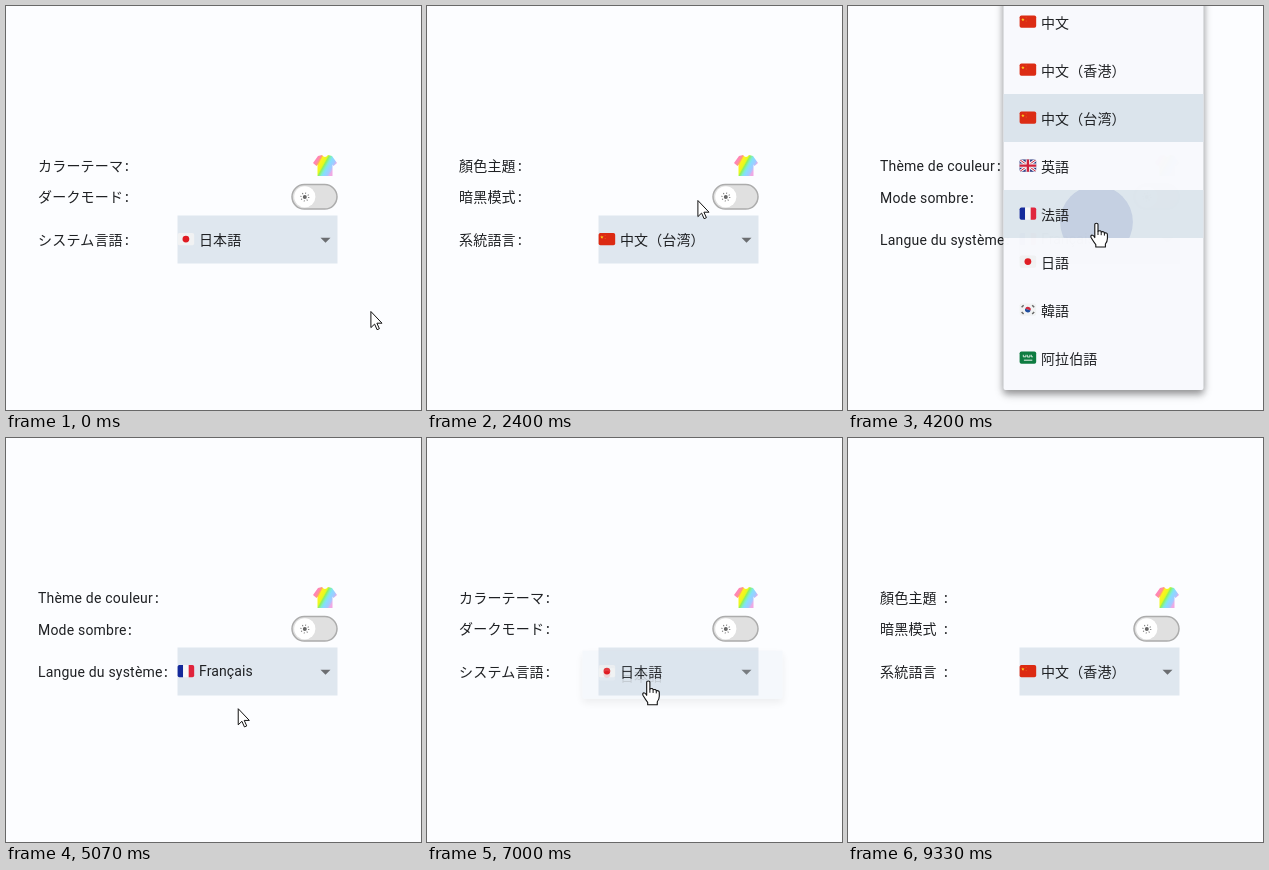
These frames come from a looping animation (415 px wide and 404 px high, 9.74 s). An HTML page:

```html
<!DOCTYPE html>
<html lang="ja">
<head>
<meta charset="utf-8">
<title>Language settings</title>
<style>
  html, body { margin: 0; width: 100%; height: 100%; overflow: hidden; background: #fcfdff; }
  svg { display: block; }
  text { font: 14px Roboto, "Noto Sans CJK JP", "Noto Sans CJK", sans-serif; fill: #1f2124; letter-spacing: .1px; }
  .label text { letter-spacing: .2px; }
  .label .colon { font-weight: 500; }
  .zh text { font-family: Roboto, "Noto Sans CJK TC", "Noto Sans CJK JP", "Noto Sans CJK", sans-serif; }
  #sheet { fill: #f8f9fd; filter: drop-shadow(0 4px 3px rgba(0,0,0,.25)) drop-shadow(0 3px 5px rgba(0,0,0,.25)); }
</style>
</head>
<body>
<svg id="stage" width="415" height="404" viewBox="0 0 415 404">
  <defs>
    <linearGradient id="rainbow" gradientUnits="userSpaceOnUse" x1="309" y1="153" x2="329" y2="164">
      <stop offset=".12" stop-color="#ff86b4"/><stop offset=".2" stop-color="#ffa070"/>
      <stop offset=".26" stop-color="#fff21e"/><stop offset=".42" stop-color="#e4fa1e"/>
      <stop offset=".48" stop-color="#8ef060"/><stop offset=".58" stop-color="#7fecd0"/>
      <stop offset=".66" stop-color="#86dcff"/><stop offset=".82" stop-color="#a4c8ff"/>
      <stop offset=".92" stop-color="#f0a8e4"/>
    </linearGradient>
    <clipPath id="flagClip"><rect x="-8.3" y="-6.2" width="16.6" height="12.4" rx="1.8"/></clipPath>
    <clipPath id="rowClip"><rect id="rowBox" x="155.5" width="200" height="48"/></clipPath>
  </defs>

  <path fill="url(#rainbow)" d="M312 150 L316 149 Q319 153 322 149 L326 150 L331 157 L327.5 160 L326.5 158.5 V170 H311.5 V158.5 L310.5 160 L307 157Z"/>

  <rect x="286" y="178.6" width="45" height="24.4" rx="12.2" fill="#e0e0e0" stroke="#acacac" stroke-width="1.5"/>
  <circle cx="298.8" cy="190.8" r="10.6" fill="#fff"/>
  <g stroke="#777" fill="#666">
    <circle cx="298.8" cy="191" r="2" stroke="none"/>
    <circle cx="298.8" cy="191" r="3.9" fill="none" stroke-width="1.3" stroke-dasharray=".9 2.16"/>
  </g>

  <rect x="171.5" y="209.5" width="160" height="48" fill="#dfe7ef"/>
  <path d="M314.5 231.7 H324.5 L319.5 236.7Z" fill="#6c6e71"/>
  <g id="labels"></g>

  <g id="menu">
    <rect id="sheet" x="155.5" width="200" rx="2"/>
    <g id="rows"></g>
  </g>

  <g id="arrow">
    <path d="M.9 .5 V16.6 L4.6 13.1 L7.1 18.7 L9.4 17.7 L6.9 12.2 H12Z" fill="#fff" stroke="#111"/>
  </g>
  <g id="hand">
    <g transform="translate(-.6 -.4)">
      <path d="M-1.6 15 V2 Q-1.6 .6 0 .6 Q1.6 .6 1.6 2 V8.6 Q4.4 7.4 4.8 9.4 Q7.4 8.4 8 10.4 Q11 9.8 11 12.2 V16 Q11 19 9 21.4 V24.4 H-.6 V22 Q-2.6 19.6 -5.2 15.2 Q-6.2 13 -4.4 12.4 Q-3 12.4 -1.6 15Z"
        fill="#fff" stroke="#111" stroke-width="1.1" stroke-linejoin="round"/>
      <path d="M1.6 8.6 V12.4 M4.8 9.4 V12.6 M8 10.4 V13" stroke="#111" fill="none"/>
    </g>
  </g>
</svg>

<script>
const LOOP = 9740, FPS = 15, ROW = 48, LEFT = 155.5, WIDTH = 200;
const $ = id => document.getElementById(id);

const zhNames = ['中文', '中文（香港）', '中文（台湾）', '英語', '法語', '日語', '韓語', '阿拉伯語'];
const zhLabels = ['顏色主題', '暗黑模式', '系統語言'];
const langs = {
  ja: { labels: ['カラーテーマ', 'ダークモード', 'システム言語'], colons: [121, 121, 121], sel: 5, top: -35.3,
        names: ['中国語', '中国語（香港）', '中国語(台湾)', '英語', 'フランス語', '日本語', '韓国語', 'アラビア語'] },
  tw: { labels: zhLabels, colons: [93, 93, 93], sel: 2, top: -16, names: zhNames, zh: true },
  fr: { labels: ['Thème de couleur', 'Mode sombre', 'Langue du système'], colons: [151, 124, 160], sel: 4, top: -16, latin: true,
        names: ['Chinois', 'Chinese (Hong Kong)', 'Chinois (Taïwan)', 'Anglais', 'Français', 'Japonais', 'Coréen', 'Arabe'] },
  hk: { labels: zhLabels, colons: [98, 98, 98], sel: 1, top: -16, names: zhNames, zh: true }
};

// Each visit to the menu: opened, item pressed, item released
const visits = [
  { from: 'ja', to: 'tw', open: 630, press: 2060, up: 2199, item: 2 },
  { from: 'tw', to: 'fr', open: 2960, press: 4060, up: 4199, item: 4 },
  { from: 'fr', to: 'ja', open: 5333, press: 6460, up: 6630, item: 5 },
  { from: 'ja', to: 'hk', open: 6990, press: 8660, up: 8799, item: 1 }
];

// Pointer tip: time, x, y
const path = [
  [0, 364, 305], [70, 364, 305], [600, 304, 239], [1130, 304, 239], [1530, 290, 138],
  [1870, 290, 138], [1930, 280, 108], [2230, 280, 108], [2400, 270, 194], [2650, 272, 225],
  [2930, 255, 215], [3440, 255, 215], [3670, 250, 78], [3930, 249, 217], [4480, 249, 217],
  [4900, 238, 290], [5300, 222, 242.5], [6140, 222, 242.5], [6200, 221.5, 242], [7250, 222, 243],
  [7533, 240, 12], [7670, 192, 1], [7950, 192, 1], [8130, 256, 27], [8420, 256, 27],
  [8530, 177, 38], [8850, 177, 38], [9320, 215, 424], [LOOP, 215, 424]
];

const clamp = v => Math.max(0, Math.min(1, v));
const mix = (a, b, p) => a + (b - a) * p;
const rect = (x, y, w, h, fill) => `<rect x="${x}" y="${y}" width="${w}" height="${h}" fill="${fill}"/>`;
const line = (d, color, w) => `<path d="${d}" stroke="${color}" stroke-width="${w}" fill="none"/>`;
const text = (x, y, s, extra = '') => `<text x="${x}" y="${y}" ${extra}>${s}</text>`;

const china = rect(-9, -7, 18, 14, '#dc2a12') +
  '<path d="M-5 -3.6 L-4.5 -2.6 L-3.4 -2.5 L-4.2 -1.7 L-4 -.6 L-5 -1.2 L-6 -.6 L-5.8 -1.7 L-6.6 -2.5 L-5.5 -2.6Z" fill="#f8c41c"/>' +
  '<circle cx="-1.8" cy="-3.8" r=".4" fill="#ee8c1a"/><circle cx="-1.8" cy="-.6" r=".4" fill="#ee8c1a"/>';
const cross = 'M0 -7 V7 M-9 0 H9', saltire = 'M-9 -6.6 L9 6.6 M9 -6.6 L-9 6.6';
const white = rect(-9, -7, 18, 14, '#f1f2f3');
const flags = [
  china, china, china,
  rect(-9, -7, 18, 14, '#23307c') + line(saltire, '#f4f4f6', 3) + line(saltire, '#d0263c', 1) +
    line(cross, '#f4f4f6', 4.4) + line(cross, '#d0203a', 2.4),
  rect(-9, -7, 6.2, 14, '#14299a') + rect(-2.8, -7, 5.6, 14, '#f7f7f8') + rect(2.8, -7, 6.2, 14, '#e0243c'),
  white + '<circle r="3.4" fill="#e01b22"/>',
  white + '<path d="M-2.7 -.9 A2.8 2.8 0 0 1 2.7 .9Z" fill="#d0283e"/><path d="M-2.7 -.9 A2.8 2.8 0 0 0 2.7 .9Z" fill="#1c4a9c"/>' +
    line('M-6.3 -2.4 L-4.3 -4.4 M4.3 -4.4 L6.3 -2.4 M-6.3 2.4 L-4.3 4.4 M4.3 4.4 L6.3 2.4', '#666', 1.5),
  rect(-9, -7, 18, 14, '#0c7b3f') + line('M-4.6 -2.8 V-.8 H-2 V-2.8 M-.6 -2.8 V-.6 H2 V-2.8 M3.4 -2.8 V-.8 H5', '#e6f2ea', .9) +
    line('M-4 2.6 H4.4', '#e6f2ea', 1)
];

function entry(lang, i, mid) {
  const flag = `<g transform="translate(179.9 ${mid - .4})"><g clip-path="url(#flagClip)">${flags[i]}</g></g>`;
  return flag + text(193, mid + (lang.latin ? 4.5 : 5.9), lang.names[i]);
}

function labelsFor(lang) {
  const base = lang.latin ? [165.3, 196.5, 238.5] : [165, 196, 239];
  const rows = lang.labels.map((s, i) =>
    text(32, base[i], s) + text(lang.colons[i], base[i], ':', 'class="colon" text-anchor="middle"'));
  return `<g class="label">${rows.join('')}</g>${entry(lang, lang.sel, 233.5)}`;
}

function tip(t) {
  const i = Math.max(1, path.findIndex(k => k[0] >= t));
  const [a, b] = [path[i - 1], path[i]];
  const p = clamp((t - a[0]) / (b[0] - a[0]));
  return [mix(a[1], b[1], p), mix(a[2], b[2], p)];
}

function rowColor(selected, hovered, pressed) {
  if (pressed) return '#dde6ed';
  if (selected) return hovered ? '#cbd6e4' : '#dbe4ec';
  return hovered ? '#e3eaf2' : 'none';
}

function drawMenu(v, t) {
  const lang = langs[v.from], p = (t - v.open) / 300;
  const rowY = i => lang.top + 8 + ROW * i;
  const grow = clamp((p - .25) * 4), selY = rowY(lang.sel);
  const y = mix(selY, lang.top, grow), bottom = mix(selY + ROW, lang.top + 400, grow);
  $('sheet').setAttribute('y', y);
  $('sheet').setAttribute('height', bottom - y);
  $('menu').setAttribute('opacity', Math.min(clamp(p * 4), clamp(1 - (t - v.up) / 75)));

  const [, hoverY] = tip(Math.max(0, t - 62));
  const hover = Math.max(1, Math.floor((hoverY - rowY(0)) / ROW));
  const unit = .5 / 9.5;
  $('rows').setAttribute('class', lang.zh ? 'zh' : '');
  $('rows').innerHTML = lang.names.map((_, i) => {
    const pressed = t >= v.press && i === v.item, top = rowY(i);
    const shown = i === lang.sel ? 1 : clamp((p - .5 - (i + 1) * unit) / (1.5 * unit));
    let ink = '';
    if (pressed) {
      const age = t - v.press, [x, cy] = tip(v.press);
      $('rowBox').setAttribute('y', top);
      ink = `<g clip-path="url(#rowClip)"><circle cx="${x - .5}" cy="${cy - 1}" r="${age * .26}" fill="#c5d0e2" opacity="${clamp(age / 75)}"/></g>`;
    }
    const back = rect(LEFT, top, WIDTH, ROW, rowColor(i === lang.sel, i === hover, pressed));
    return `<g opacity="${shown}">${back}${ink}${entry(lang, i, top + ROW / 2)}</g>`;
  }).join('');
}

let shownLang = '';
function render(t) {
  const done = visits.filter(v => t >= v.up);
  const key = done.length ? done[done.length - 1].to : 'ja';
  if (key !== shownLang) {
    shownLang = key;
    $('labels').innerHTML = labelsFor(langs[key]);
    $('labels').setAttribute('class', langs[key].zh ? 'zh' : '');
  }

  const visit = visits.find(v => t > v.open && t < v.up + 75);
  $('menu').style.display = visit ? '' : 'none';
  if (visit) drawMenu(visit, t);

  const [x, y] = tip(t);
  const onButton = x > 171 && x < 332 && y > 209 && y < 258;
  const active = visit || onButton;
  $('hand').style.display = active ? '' : 'none';
  $('arrow').style.display = active ? 'none' : '';
  $(active ? 'hand' : 'arrow').setAttribute('transform', `translate(${x} ${y})`);
}

const start = performance.now();
let last = -1;
function tick() {
  const t = (performance.now() - start) % LOOP;
  const step = Math.floor((t + 5) * FPS / 1000);
  if (step !== last) {
    last = step;
    render(Math.min(step * 1000 / FPS, LOOP));
  }
  requestAnimationFrame(tick);
}
tick();
</script>
</body>
</html>
```
